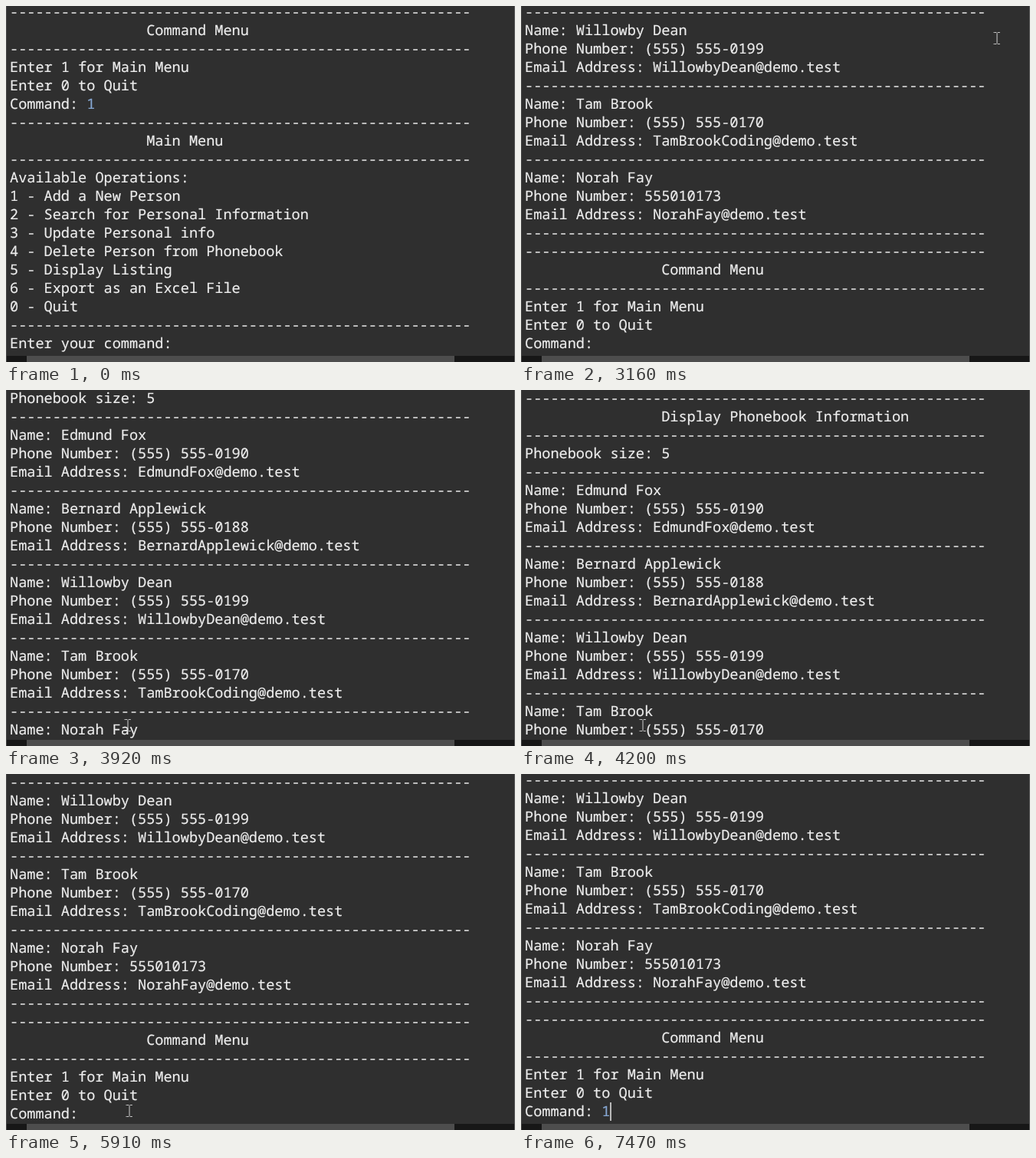
An HTML page that plays this animation: 664 px wide and 464 px high, repeating every 7.99 s.

```html
<!DOCTYPE html>
<html lang="en">
<head>
<meta charset="utf-8">
<title>Phonebook console</title>
<style>
  html, body { margin: 0; width: 100%; height: 100%; overflow: hidden; background: #2f2f2f; }
  #stage { position: relative; width: 664px; height: 464px; overflow: hidden; background: #2f2f2f; }
  #stage > * { position: absolute; }

  #log {
    left: 5px; top: -4px; margin: 0;
    font: 18.57px/24px "Noto Sans Mono", "DejaVu Sans Mono", monospace;
    color: #ededed; white-space: pre; -webkit-text-stroke: .2px;
    text-rendering: geometricPrecision; font-variant-ligatures: none;
  }
  #log b { font-weight: 400; color: #86a7d2; }

  #log, #caret, #mouse, .five, .one { animation: 7990ms step-end infinite; }
  #log { animation-name: scroll; }
  #caret { animation-name: caret; left: 0; top: 428px; width: 2px; height: 24px; background: #b9b9b9; }
  #mouse { animation-name: mouse; left: -4.5px; top: -8px; }
  .five { animation-name: five; }
  .one { animation-name: one; }

  .edge { top: 0; width: 1px; height: 464px; background: #4a4a4a; }
  .left { left: 0; }
  .right { right: 0; background: #626262; }
  #track { left: 1px; top: 456px; width: 663px; height: 8px; background: #171717; }
  #thumb { left: 27px; top: 456px; width: 558px; height: 8px; background: #4d4d4d; }

  @keyframes scroll {
    0%     { transform: translateY(0); }
    16.64% { transform: translateY(-744px); }
    44.43% { transform: translateY(-669px); }
    45.93% { transform: translateY(-597px); }
    49.06% { transform: translateY(-525px); }
    52.56% { transform: translateY(-453px); }
    70.96% { transform: translateY(-525px); }
    72.46% { transform: translateY(-669px); }
    73.96% { transform: translateY(-741px); }
    91.98%, 100% { transform: translateY(-744px); }
  }
  @keyframes caret {
    0%     { opacity: 0; transform: translateX(227px); }
    6.63%  { opacity: 1; transform: translateX(227px); }
    8.51%  { opacity: 1; transform: translateX(239px); }
    14.76% { opacity: 0; transform: translateX(239px); }
    91.98% { opacity: 1; transform: translateX(105px); }
    93.49%, 100% { opacity: 1; transform: translateX(116px); }
  }
  @keyframes mouse {
    0%     { opacity: 0; transform: translate(620.5px, 42px); }
    39.54% { opacity: 1; transform: translate(620.5px, 42px); }
    41.05% { opacity: 1; transform: translate(330.5px, 236px); }
    42.55% { opacity: 1; transform: translate(126.5px, 399px); }
    44.43% { opacity: 1; transform: translate(158.5px, 432px); }
    45.93% { opacity: 1; transform: translate(158.5px, 437px); }
    73.96% { opacity: 1; transform: translate(160.5px, 439px); }
    80.6%  { opacity: 0; transform: translate(160.5px, 439px); }
    83.72% { opacity: 1; transform: translate(628.5px, 420px); }
    85.6%  { opacity: 1; transform: translate(450.5px, 415px); }
    87.1%  { opacity: 1; transform: translate(230.5px, 426px); }
    88.61% { opacity: 1; transform: translate(177.5px, 430px); }
    91.98%, 100% { opacity: 0; transform: translate(177.5px, 430px); }
  }
  @keyframes five {
    0% { opacity: 0; }
    8.51%, 100% { opacity: 1; }
  }
  @keyframes one {
    0% { opacity: 0; }
    93.49%, 100% { opacity: 1; }
  }
</style>
</head>
<body>
<div id="stage">
  <pre id="log"></pre>
  <div id="caret"></div>
  <svg id="mouse" width="9" height="16" viewBox="0 0 9 16" fill="none" stroke="#d2d2d2">
    <path d="M0.5 .5H3.5L4.5 1.5L5.5 .5H8.5M4.5 1.5V14.5M.5 15.5H3.5L4.5 14.5L5.5 15.5H8.5"/>
  </svg>
  <div id="track"></div>
  <div id="thumb"></div>
  <div class="edge left"></div>
  <div class="edge right"></div>
</div>
<script>
  const rule = "-".repeat(54);
  const heading = text => [rule, " ".repeat(16) + text, rule];
  const person = (name, phone, user = name.replace(" ", "")) => [
    "Name: " + name,
    "Phone Number: " + phone,
    `Email Address: ${user}@demo.test`,
    rule
  ];
  const prompt = input => [
    ...heading("Command Menu"),
    "Enter 1 for Main Menu",
    "Enter 0 to Quit",
    "Command: " + input
  ];

  document.getElementById("log").innerHTML = [
    ...prompt("<b>1</b>"),
    ...heading("Main Menu"),
    "Available Operations:",
    "1 - Add a New Person",
    "2 - Search for Personal Information",
    "3 - Update Personal info",
    "4 - Delete Person from Phonebook",
    "5 - Display Listing",
    "6 - Export as an Excel File",
    "0 - Quit",
    rule,
    'Enter your command: <b class="five">5</b>',
    ...heading("Display Phonebook Information"),
    "Phonebook size: 5",
    rule,
    ...person("Edmund Fox", "(555) 555-0190"),
    ...person("Bernard Applewick", "(555) 555-0188"),
    ...person("Willowby Dean", "(555) 555-0199"),
    ...person("Tam Brook", "(555) 555-0170", "TamBrookCoding"),
    ...person("Norah Fay", "555010173"),
    ...prompt('<b class="one">1</b>')
  ].join("\n");
</script>
</body>
</html>
```
